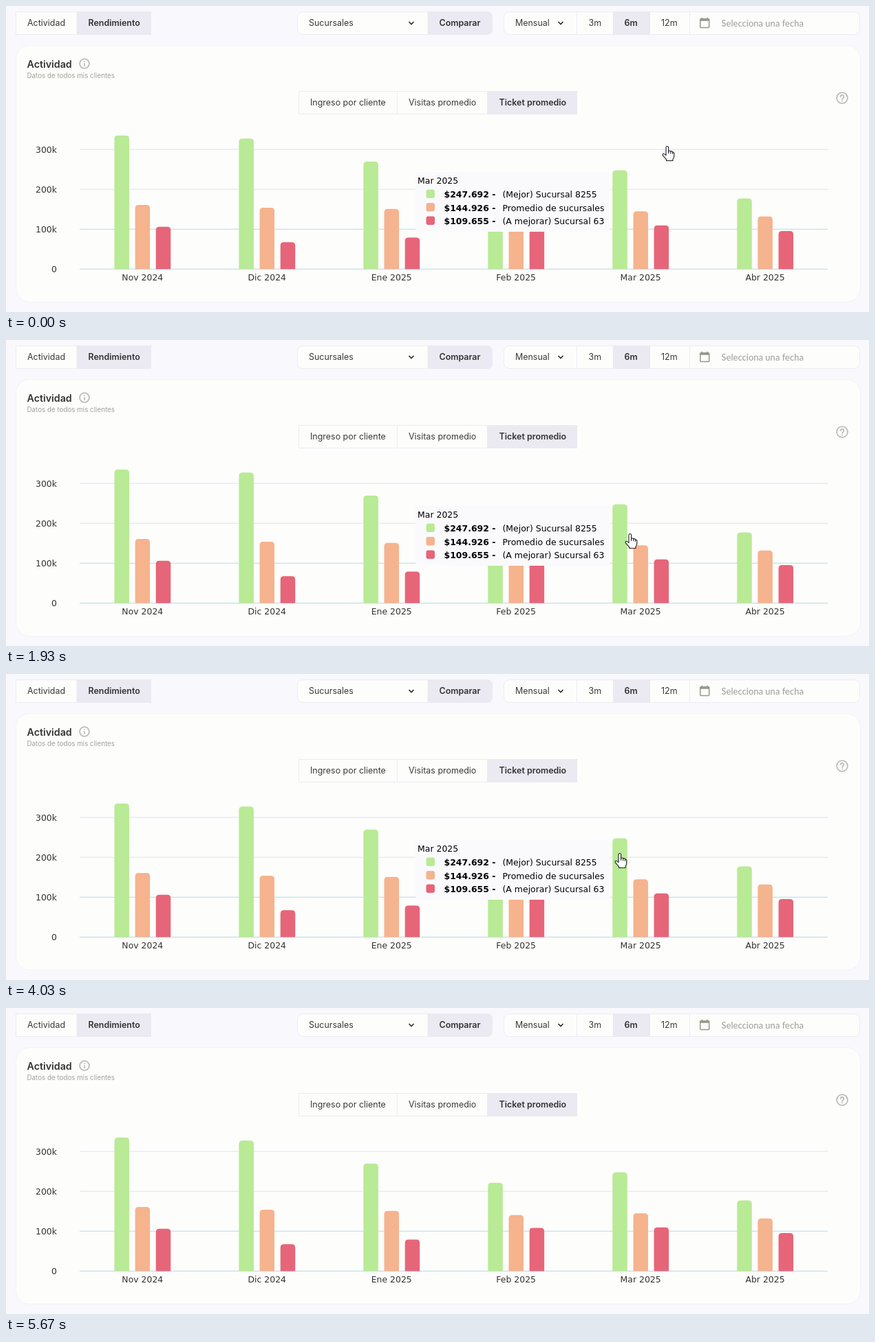
Write an HTML page that moves like this. It is 1254 by 446 pixels and loops after 5710 ms.

```html
<!DOCTYPE html>
<html lang="es">
<head>
<meta charset="utf-8">
<title>Rendimiento</title>
<style>
html, body { margin: 0; width: 100%; height: 100%; overflow: hidden; background: #f8f8fd; }
svg { display: block; width: 1254px; height: 446px; }
text { font: 12.46px Inter, sans-serif; fill: #3a3a3a; white-space: pre; }
.b { font-weight: 600; fill: #333; }
.title { font-size: 14.24px; }
.sub { font-size: 9.8px; fill: #a0a09c; }
.date { font: 500 13px Lato, sans-serif; fill: #a2a29e; }
.chart { font: 12.46px "DejaVu Sans", sans-serif; fill: #333; }
.tip { font: 12.46px "DejaVu Sans", sans-serif; fill: #000; }
.tip.b { font-weight: 700; }
.icon { fill: none; stroke: #bcbcb8; stroke-width: 1.8; stroke-linecap: round; }
.chev { fill: none; stroke: #2b2b2b; stroke-width: 1.6; }
.cur { fill: #fff; stroke: #1c1c24; stroke-width: 1.1; stroke-linejoin: round; }
</style>
</head>
<body>
<svg id="stage" viewBox="0 0 1254 446" xmlns="http://www.w3.org/2000/svg"></svg>
<script>
const stage = document.getElementById('stage');
const WHITE = '#fdfdfb', LILAC = '#ebe9f1', EDGE = '#ececf5';
const COLORS = ['#b9ea95', '#f5b38e', '#e76578'];
const LOOP = 5710;

function add(tag, attrs, parent = stage, content = '') {
  const el = document.createElementNS('http://www.w3.org/2000/svg', tag);
  for (const k in attrs) el.setAttribute(k, attrs[k]);
  el.textContent = content;
  parent.appendChild(el);
  return el;
}
const rect = (x, y, x2, y2, fill, rx = 0, more = {}, parent = stage) =>
  add('rect', { x, y, width: x2 - x, height: y2 - y, fill, rx, ...more }, parent);
const text = (x, y, s, cls = '', parent = stage, anchor = 'start') =>
  add('text', { x, y, class: cls, 'text-anchor': anchor }, parent, s);
const path = (d, cls, parent = stage) => add('path', { d, class: cls }, parent);
const box = (x, y, x2, y2, r = 0) =>
  rect(x + .5, y + .5, x2 - .5, y2 - .5, WHITE, r, { stroke: EDGE });
const sep = (x, y) => rect(x, y, x + 1, y + 33, EDGE);
const chevron = x => path(`M${x - 3.5} 23l3.5 3.5l3.5 -3.5`, 'chev');

// Top bar
box(14, 8, 211, 42);
rect(102.5, 8, 211, 42, LILAC);
text(31, 29, 'Actividad');
text(119.5, 29, 'Rendimiento', 'b');

box(423, 8, 707, 42, 8);
path('M612.5 8H699a8 8 0 0 1 8 8V34a8 8 0 0 1 -8 8H612.5Z').setAttribute('fill', LILAC);
text(440, 29, 'Sucursales');
chevron(589);
text(629.5, 29, 'Comparar', 'b');

box(723, 8, 1241, 42, 8);
rect(882, 8, 936, 42, LILAC);
sep(829, 8);
sep(993, 8);
text(740, 29, 'Mensual');
chevron(806);
text(846.5, 29, '3m');
text(898.5, 29, '6m', 'b');
text(952, 29, '12m');
rect(1008.8, 19, 1021.7, 31.5, 'none', 1, { stroke: '#96988a', 'stroke-width': 1.5 });
rect(1008.5, 18.5, 1022, 21.8, '#96988a');
rect(1010.6, 16.8, 1012.2, 19, '#96988a');
rect(1018.2, 16.8, 1019.8, 19, '#96988a');
text(1039.5, 29.5, 'Selecciona una fecha', 'date');

// Card
rect(14.5, 57.5, 1241.5, 431.5, WHITE, 20, { stroke: '#f3f3f8' });
text(30.5, 89.5, 'Actividad', 'b title');
text(30.5, 104.5, 'Datos de todos mis clientes', 'sub');
add('circle', { cx: 114, cy: 84, r: 6.9, class: 'icon' });
path('M114 84V87M114 80.9V81', 'icon');
add('circle', { cx: 1215, cy: 134, r: 7.9, class: 'icon' });
path('M1212.6 132.2a2.4 2.4 0 1 1 3.8 1.9q-1.4 .9 -1.4 2M1215 138.3V138.4', 'icon');

box(425, 124, 830, 158);
sep(568, 124);
rect(699, 124, 830, 158, LILAC);
text(442, 145, 'Ingreso por cliente');
text(585, 145, 'Visitas promedio');
text(716.5, 145, 'Ticket promedio', 'b');

// Chart
const BASE = 383.5, UNIT = 58.15;
['#c6dff0', '#c9e2ee', '#e4eee8', '#e0ecfa'].forEach((c, i) => {
  const y = BASE - i * UNIT;
  rect(107, y - .7, 1194, y + .7, c);
  text(74, y + 4.5, i ? i + '00k' : '0', 'chart', stage, 'end');
});
const groups = [
  ['Nov 2024', 335, 161, 106], ['Dic 2024', 327, 154, 67.5],
  ['Ene 2025', 269.5, 151, 79], ['Feb 2025', 221.5, 140.5, 108.5],
  ['Mar 2025', 247.7, 144.9, 109.7], ['Abr 2025', 177, 132, 95.5]
];
groups.forEach(([name, ...vals], g) => {
  const mid = 198.3 + g * 180.95;
  vals.forEach((v, i) => {
    const x = mid - 40.8 + i * 30.15, h = v * UNIT / 100;
    path(`M${x} ${BASE}v${5 - h}q0 -5 5 -5h11.5q5 0 5 5V${BASE}Z`).setAttribute('fill', COLORS[i]);
  });
  text(mid, 399.5, name, 'chart', stage, 'middle');
});

// Tooltip
const tip = add('g', {});
rect(595, 242, 878, 329, '#fafafd', 3, {}, tip);
text(598, 259, 'Mar 2025', 'tip', tip);
[['$247.692', '(Mejor) Sucursal 8255'],
 ['$144.926', 'Promedio de sucursales'],
 ['$109.655', '(A mejorar) Sucursal 63']].forEach(([sum, label], i) => {
  const y = 279 + i * 19.5;
  rect(610.5, y - 11.5, 623, y + 1, COLORS[i], 3, {}, tip);
  text(636.5, y, sum + ' -', 'tip b', tip);
  text(721.5, y, label, 'tip', tip);
});

// Pointer
const hand = add('g', {});
path('M-2 2.2Q-2 .5 -.3 .5Q1.5 .5 1.6 2.2V7.5Q4 6.2 4.8 8Q7 7 7.6 9Q9.8 8.6 9.8 11V14.5Q9.8 17 8 19V21.5H-1.5V19.6L-6.6 13.8Q-7.6 11.6 -5.6 11.2Q-4.4 11.2 -2 13.6Z', 'cur', hand);
path('M1.6 7.5V11M4.8 8V11.3M7.6 9V11.8', 'cur', hand);
const arrow = add('g', {});
path('M0 0V16L3.8 12.6L6.4 18.4L8.9 17.3L6.3 11.6H11.4Z', 'cur', arrow);

// time, x, y of the pointer tip
const track = [
  [0, 961, 204], [130, 950, 221], [300, 930, 252], [430, 918, 268], [560, 910, 279], [680, 907, 282],
  [3600, 907, 282], [3850, 898, 271], [4000, 892, 262], [4130, 890, 258],
  [4260, 858, 214], [4400, 782, 134], [4530, 711, 59], [4630, 662, 2], [4680, 640, -30]
];
const LEAVE = 4330;

function place(t) {
  const n = track.findIndex(k => k[0] > t);
  if (n < 0) return track[track.length - 1].slice(1);
  const [a, b] = [track[n - 1], track[n]];
  const p = (t - a[0]) / (b[0] - a[0]);
  return [1, 2].map(i => Math.round(a[i] + (b[i] - a[i]) * p));
}

function draw(t) {
  const inside = t < LEAVE;
  const move = `translate(${place(t)})`;
  hand.setAttribute('transform', move);
  arrow.setAttribute('transform', move);
  hand.setAttribute('visibility', inside ? 'visible' : 'hidden');
  tip.setAttribute('visibility', inside ? 'visible' : 'hidden');
  arrow.setAttribute('visibility', inside ? 'hidden' : 'visible');
}

const start = performance.now();
function tick() {
  draw((performance.now() - start) % LOOP);
  requestAnimationFrame(tick);
}
draw(0);
tick();
</script>
</body>
</html>
```
